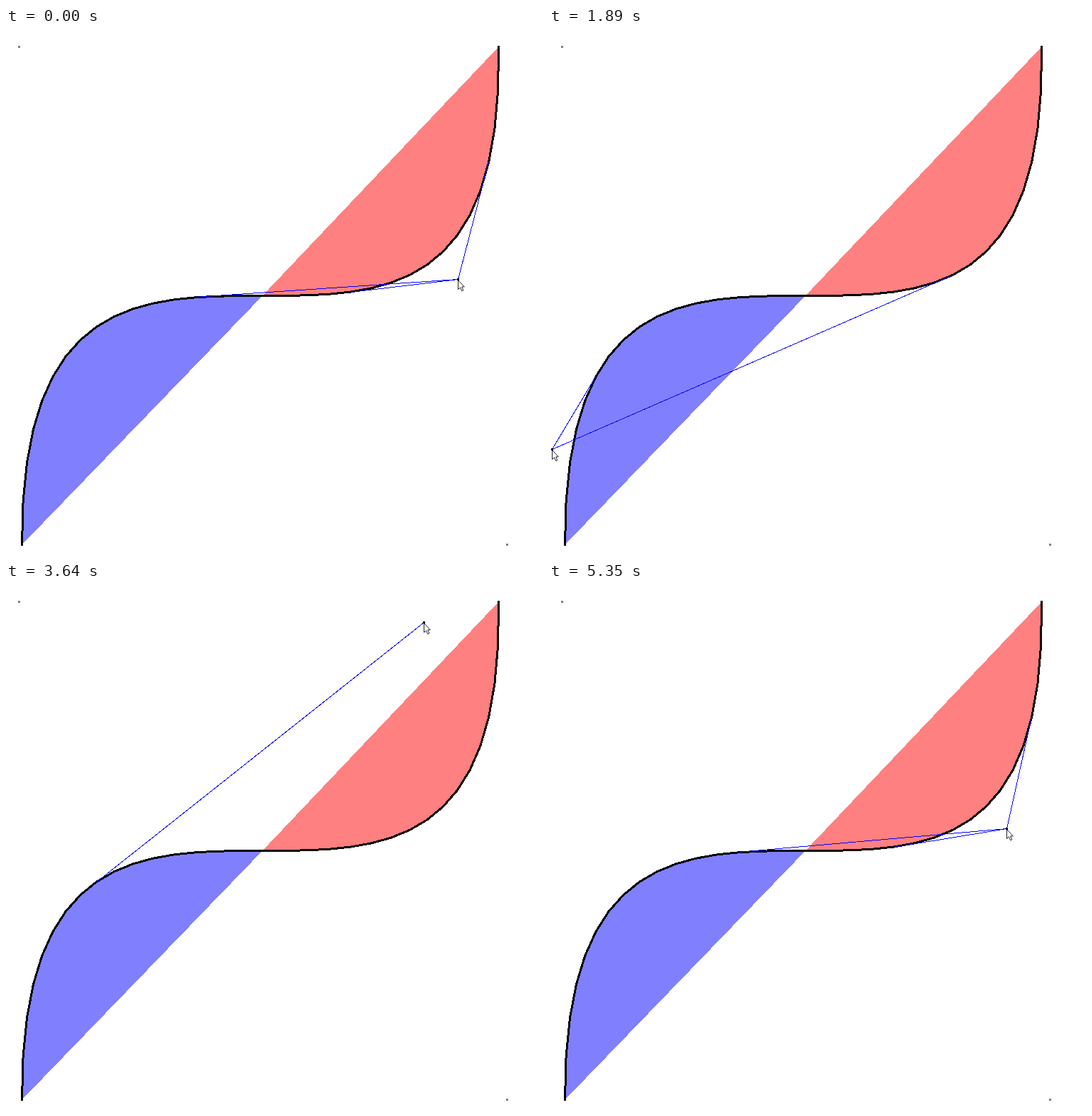
Write an HTML page that moves like this. It is 756 px wide and 741 px high and loops after 5.39 s.

```html
<!DOCTYPE html>
<html lang="en">
<head>
<meta charset="utf-8">
<title>Tangents to a curve</title>
<style>
  html, body { margin: 0; width: 100%; height: 100%; overflow: hidden; background: #fff; }
  svg { display: block; width: 756px; height: 741px; }
</style>
</head>
<body>
<svg viewBox="0 0 756 741" shape-rendering="crispEdges">
  <polygon id="low" fill="#8080ff"/>
  <polygon id="high" fill="#ff8080"/>
  <polyline id="curve" fill="none" stroke="#000" stroke-width="3" stroke-linejoin="round"/>
  <g id="dots"></g>
  <path id="tangents" fill="none" stroke="#00f"/>
  <g id="pointer">
    <rect x="-1" y="-1" width="3" height="3"/>
    <path d="M.5 1.5V14.5L3.5 11.8L5.6 16.7L7.8 15.8L5.8 10.9H9.3Z" fill="#fff" stroke="#222" shape-rendering="geometricPrecision"/>
  </g>
</svg>
<script>
const LOOP = 5390, STEPS = 114, LEAD = 12, SEGMENTS = 32;
const ctrl = [[22, 726], [18, 26], [705, 726], [693, 26]];

// Turning points of the pointer: step, x, y
const keys = [
  [0, 636, 353], [12, 448, 544], [16, 311, 682], [21, 149, 734], [26, 149, 734],
  [40, 4, 592], [50, 55, 430], [59, 124, 390], [77, 588, 55], [87, 706, 11],
  [98, 701, 169], [113, 644, 345]
];

const $ = id => document.getElementById(id);

function bezier(t) {
  const u = 1 - t, w = [u * u * u, 3 * u * u * t, 3 * u * t * t, t * t * t];
  return [0, 1].map(a => ctrl.reduce((sum, p, i) => sum + p[a] * w[i], 0));
}

const verts = Array.from({ length: SEGMENTS + 1 }, (_, i) => bezier(i / SEGMENTS));
const pts = list => list.map(([x, y]) => `${x + 0.5},${y + 0.5}`).join(' ');

$('curve').setAttribute('points', pts(verts));
$('low').setAttribute('points', pts(verts.slice(0, SEGMENTS / 2 + 1)));
$('high').setAttribute('points', pts(verts.slice(SEGMENTS / 2)));
$('dots').innerHTML = ctrl.map(([x, y], i) =>
  `<rect x="${x - 1}" y="${y - 1}" width="3" height="3" fill="${i % 3 ? '#808080' : '#000'}"/>`).join('');

// Keys repeat endlessly, one loop after another
function key(i) {
  const n = keys.length, turn = Math.floor(i / n);
  const [k, x, y] = keys[i - turn * n];
  return [k + turn * STEPS, x, y];
}

function speed(i, a) {
  const p = key(i), q = key(i + 1);
  return (q[a] - p[a]) / (q[0] - p[0]);
}

// The harmonic mean keeps the path monotone between keys
function slope(i, a) {
  const p = speed(i - 1, a), q = speed(i, a);
  return p * q > 0 ? 2 * p * q / (p + q) : 0;
}

function pointerAt(k) {
  const i = keys.findLastIndex(p => p[0] <= k);
  const from = key(i), to = key(i + 1);
  const h = to[0] - from[0], s = (k - from[0]) / h, r = 1 - s;
  return [1, 2].map(a => Math.round(
    r * r * ((1 + 2 * s) * from[a] + h * s * slope(i, a)) +
    s * s * ((1 + 2 * r) * to[a] - h * r * slope(i + 1, a))));
}

// Which side of segment i the point lies on
function side(i, [x, y]) {
  const [ax, ay] = verts[i], [bx, by] = verts[i + 1];
  return (bx - ax) * (y - ay) >= (by - ay) * (x - ax);
}

// A tangent touches each vertex whose two segments see the point from opposite sides
function draw(k) {
  const p = pointerAt(k);
  let d = '';
  for (let i = 1; i < SEGMENTS; i++) {
    if (side(i - 1, p) !== side(i, p)) d += `M${pts([p])}L${pts([verts[i].map(Math.round)])}`;
  }
  $('tangents').setAttribute('d', d);
  $('pointer').setAttribute('transform', `translate(${p})`);
}

let shown = -1;
function tick() {
  const t = performance.now() % LOOP;
  const k = Math.floor((t + LEAD) * STEPS / LOOP) % STEPS;
  if (k !== shown) draw(shown = k);
  requestAnimationFrame(tick);
}
tick();
</script>
</body>
</html>
```
